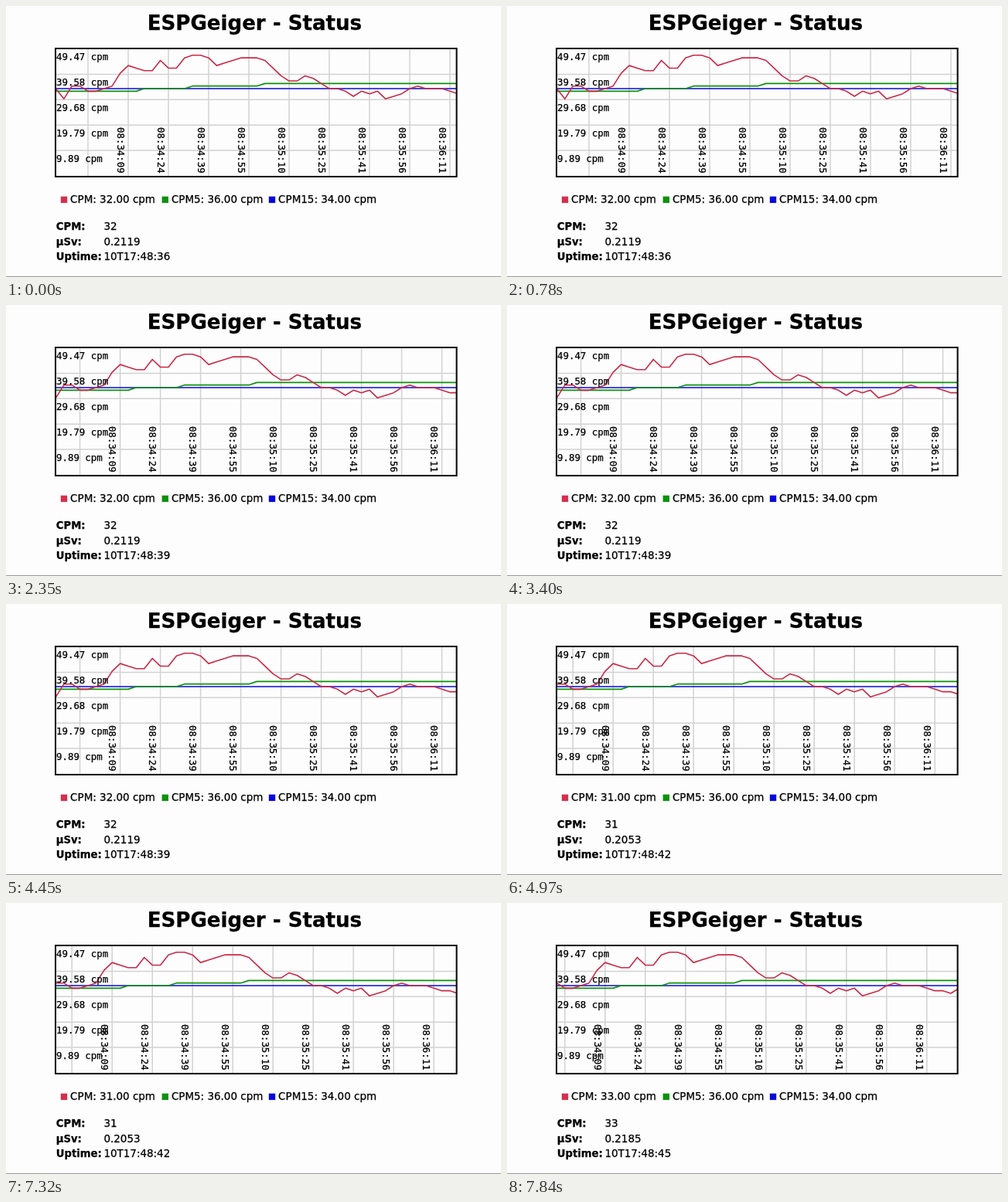
Animation, 640 px wide and 351 px high, one loop 8000 ms. Source, as an HTML page with a canvas:

```html
<!DOCTYPE html>
<html lang="en">
<head>
<meta charset="utf-8">
<title>ESPGeiger - Status</title>
<style>
  html, body { margin: 0; width: 100%; height: 100%; overflow: hidden; background: #fdfdfd; }
  canvas { display: block; }
</style>
</head>
<body>
<canvas id="stage" width="640" height="351"></canvas>
<script>
const ctx = document.getElementById('stage').getContext('2d');

const LOOP = 8000;
const UPDATES = [2350, 4970, 7580];
const CHART = { left: 64, top: 55.6, right: 583, bottom: 220 };
const STEP = 10.4;        // distance between samples
const FIRST_X = 64.4;     // first sample before any update
const MAX = 49.475;
const WINDOW = 51;

const SANS = '"DejaVu Sans", Verdana, sans-serif';
const BODY = `13.48px ${SANS}`;
const BOLD = `bold 13.2px ${SANS}`;
const TITLE = `bold 26.1px ${SANS}`;
const MONO = '12.4px "DejaVu Sans Mono", Menlo, monospace';
const INK = '#000', GRID = '#d2d2d2';
const RED = '#d62f4d', GREEN = '#0b920b', BLUE = '#0808de';

const cpm = [
  34, 30, 35, 35, 33, 33, 34, 35, 40, 43, 42, 41, 41, 45, 42, 42, 46, 47,
  47, 46, 43, 44, 45, 46, 46, 46, 45, 42, 39, 37, 37, 39, 38, 36, 34, 34,
  33, 31, 33, 32, 33, 30, 31, 32, 34, 35, 34, 34, 34, 33, 32, 32, 31, 33
];
const cpm5 = cpm.map((_, i) => 33 + (i > 10) + (i > 16) + (i > 25));
const cpm15 = cpm.map(() => 34);
const times = ['34:09', '34:24', '34:39', '34:55', '35:10', '35:25', '35:41', '35:56', '36:11'];

const valueY = v => CHART.bottom - v / MAX * (CHART.bottom - CHART.top);

// A hairline outline gives the regular text its slightly heavy weight.
function text(str, x, y, font = BODY, align = 'left') {
  ctx.font = font;
  ctx.textAlign = align;
  ctx.fillStyle = ctx.strokeStyle = INK;
  ctx.lineWidth = 0.25;
  ctx.fillText(str, x, y);
  ctx.strokeText(str, x, y);
}

function polyline(points, color, width) {
  ctx.beginPath();
  points.forEach(([x, y]) => ctx.lineTo(x, y));
  ctx.strokeStyle = color;
  ctx.lineWidth = width;
  ctx.lineJoin = 'round';
  ctx.stroke();
}

function drawChart(shift) {
  const sampleX = i => FIRST_X + (i - shift) * STEP;
  const series = (data, color, width) => polyline(
    data.slice(0, WINDOW + shift).map((v, i) => [sampleX(i), valueY(v)]), color, width);
  const { left, top, right, bottom } = CHART;

  ctx.save();
  ctx.beginPath();
  ctx.rect(left, top, right - left, bottom - top);
  ctx.clip();

  for (let i = 1; i < 5; i++) {
    const y = valueY(MAX * i / 5);
    polyline([[left, y], [right, y]], GRID, 1.5);
  }
  for (let i = 4; i < WINDOW; i += 5) {
    polyline([[sampleX(i), top], [sampleX(i), bottom]], GRID, 1.5);
  }

  series(cpm15, BLUE, 1.7);
  series(cpm5, GREEN, 1.7);
  series(cpm, '#cc2846', 1.6);

  for (let i = 0; i < 5; i++) {
    const label = (Math.floor(MAX * (5 - i) / 5 * 100 + 0.01) / 100).toFixed(2);
    text(`${label} cpm`, 65, 70.3 + i * 32.8, MONO);
  }
  times.forEach((time, i) => {
    ctx.save();
    ctx.translate(sampleX(9 + i * 5) - 14.2, 157);
    ctx.rotate(Math.PI / 2);
    text(`08:${time}`, 0, 0, MONO);
    ctx.restore();
  });
  ctx.restore();

  ctx.strokeStyle = INK;
  ctx.lineWidth = 2;
  ctx.strokeRect(64, 55, 518.6, 166);
}

function legend(x, color, name, value) {
  ctx.fillStyle = color;
  ctx.fillRect(x, 246.7, 8.4, 8.4);
  text(`${name}: ${value.toFixed(2)} cpm`, x + 12.3, 255);
}

function row(y, name, value) {
  text(name, 64.8, y, BOLD);
  text(value, 126.4, y);
}

function draw(t) {
  const shift = UPDATES.filter(u => t >= u).length;
  const last = WINDOW - 1 + shift;

  ctx.fillStyle = '#fdfdfd';
  ctx.fillRect(0, 0, 640, 351);
  ctx.fillStyle = '#999';
  ctx.fillRect(0, 350, 640, 1);

  text('ESPGeiger - Status', 321.4, 31, TITLE, 'center');
  drawChart(shift);

  legend(70.8, RED, 'CPM', cpm[last]);
  legend(201.6, GREEN, 'CPM5', cpm5[last]);
  legend(339.8, BLUE, 'CPM15', cpm15[last]);

  row(290, 'CPM:', `${cpm[last]}`);
  row(309.5, 'µSv:', (cpm[last] / 151).toFixed(4));
  row(329, 'Uptime:', `10T17:48:${36 + shift * 3}`);
}

function frame() {
  draw(performance.now() % LOOP);
  requestAnimationFrame(frame);
}
frame();
</script>
</body>
</html>
```
